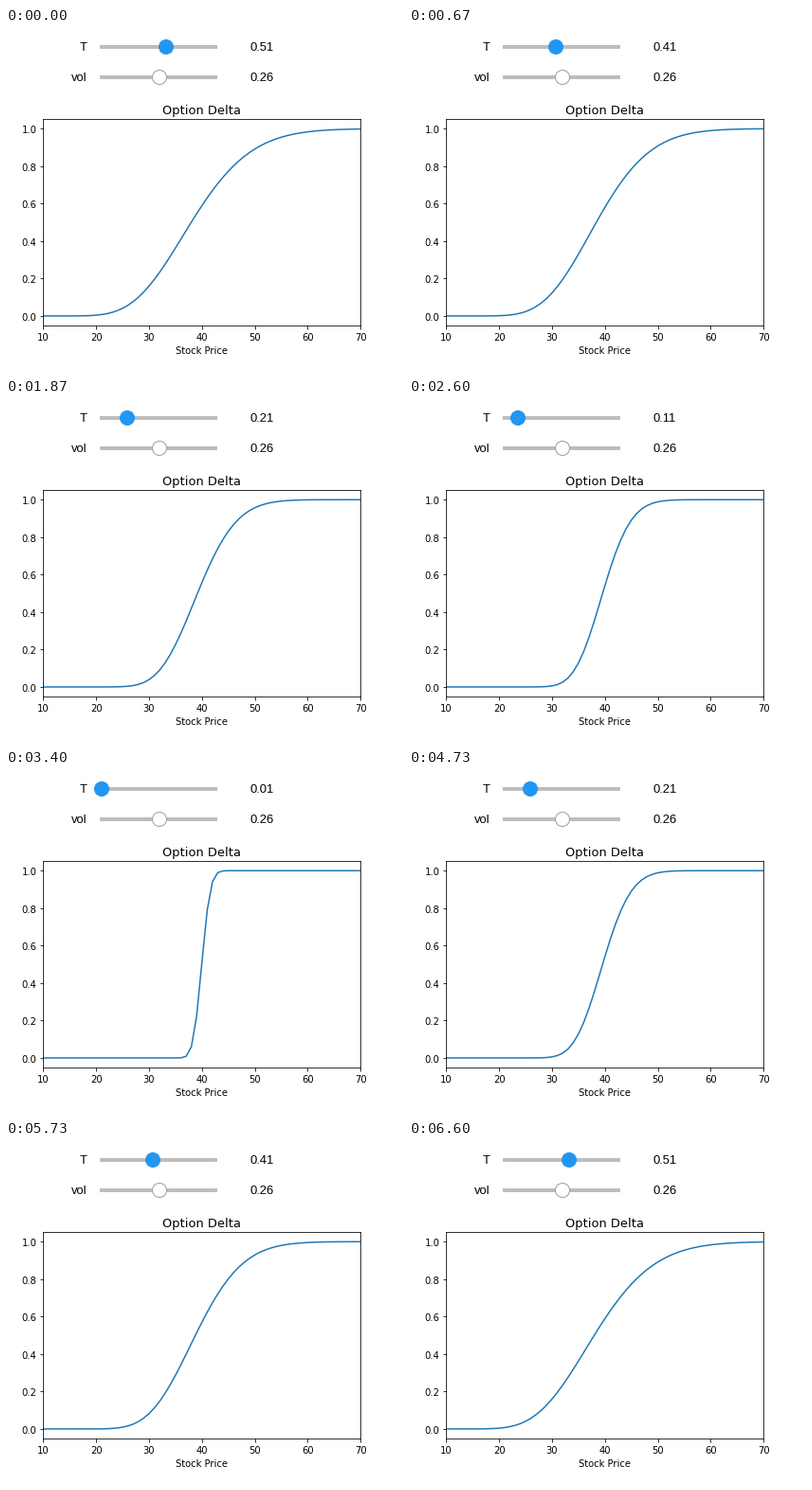
A matplotlib script for the animation above (8000 ms loop, 419 by 362 pixels).

```python
import math

import matplotlib.pyplot as plt
import numpy as np
from matplotlib.animation import FuncAnimation
from matplotlib.patches import Circle, Rectangle
from matplotlib.transforms import ScaledTranslation

W, H, DPI = 419, 362, 72
LOOP, STEP = 8000, 20
BLUE, TRACK, RIM = "#2196f3", "#bdbdbd", "#9e9e9e"

# Option model with a volatility skew
STRIKE, RATE, VOL, SKEW = 40, 0.05, 0.26, 0.001
PRICES = np.arange(10, 71)

# The slider walks down and back up; the plot follows a little later
LEVELS = [0.51, 0.41, 0.31, 0.21, 0.11, 0.01, 0.11, 0.21, 0.31, 0.41, 0.51]
SLIDER_TIMES = [0, 470, 1070, 1870, 2400, 3130, 4130, 4730, 5200, 5730, 6330]
CURVE_TIMES = [0, 670, 1270, 1870, 2600, 3400, 4330, 4930, 5400, 6000, 6600]


def delta(term):
    sigma = VOL + SKEW * (100 - PRICES)
    drift = (RATE + sigma**2 / 2) * term
    d1 = (np.log(PRICES / STRIKE) + drift) / (sigma * math.sqrt(term))
    return np.array([0.5 * (1 + math.erf(d / math.sqrt(2))) for d in d1])


def level_at(times, t):
    return LEVELS[int(np.searchsorted(times, t, side="right")) - 1]


plt.rcParams["font.family"] = "DejaVu Sans"
fig = plt.figure(figsize=((W + 1e-6) / DPI, (H + 1e-6) / DPI), dpi=DPI,
                 facecolor="white")

# Slider panel in pixel coordinates, y pointing down
panel = fig.add_axes([0, 0, 1, 1])
panel.set_xlim(0, W)
panel.set_ylim(H, 0)
panel.axis("off")


def add_slider(y, name, value, x, fill, rim):
    font = dict(family="Liberation Sans", size=13, va="baseline")
    panel.text(85.6, y + 4.4, name, ha="right", **font)
    label = panel.text(257, y + 4.4, f"{value:.2f}", ha="left", **font)
    panel.add_patch(Rectangle((99, y - 2), 124, 4, fc=TRACK, lw=0))
    knob = Circle((x, y), 7.5, fc=fill, ec=rim, lw=1, zorder=3)
    panel.add_patch(knob)
    return knob, label


def knob_x(term):
    return round(101 + 136 * (term - 0.01))


knob, label = add_slider(20, "T", LEVELS[0], knob_x(LEVELS[0]), BLUE, BLUE)
add_slider(52, "vol", VOL, 162, "white", RIM)

# Delta plot
ax = fig.add_axes([39.4 / W, 48.2 / H, 334.8 / W, 217.44 / H])
ax.set_xlim(10, 70)
ax.set_ylim(-0.05, 1.05)
ax.set_title("Option Delta", fontsize=13, pad=5)
ax.set_xlabel("Stock Price")
curves = {term: delta(term) for term in set(LEVELS)}
line, = ax.plot(PRICES, curves[LEVELS[0]], color="#1f77b4", lw=1.5)

# Tick labels sit one pixel low
drop = ScaledTranslation(0, -1 / DPI, fig.dpi_scale_trans)
for tick_label in ax.get_xticklabels() + ax.get_yticklabels():
    tick_label.set_transform(tick_label.get_transform() + drop)


def update(i):
    t = i * STEP + STEP / 2
    term = level_at(SLIDER_TIMES, t)
    knob.center = (knob_x(term), 20)
    label.set_text(f"{term:.2f}")
    line.set_ydata(curves[level_at(CURVE_TIMES, t)])
    return knob, label, line


anim = FuncAnimation(fig, update, frames=LOOP // STEP, interval=STEP,
                     repeat=True, repeat_delay=0)
plt.show()
```
